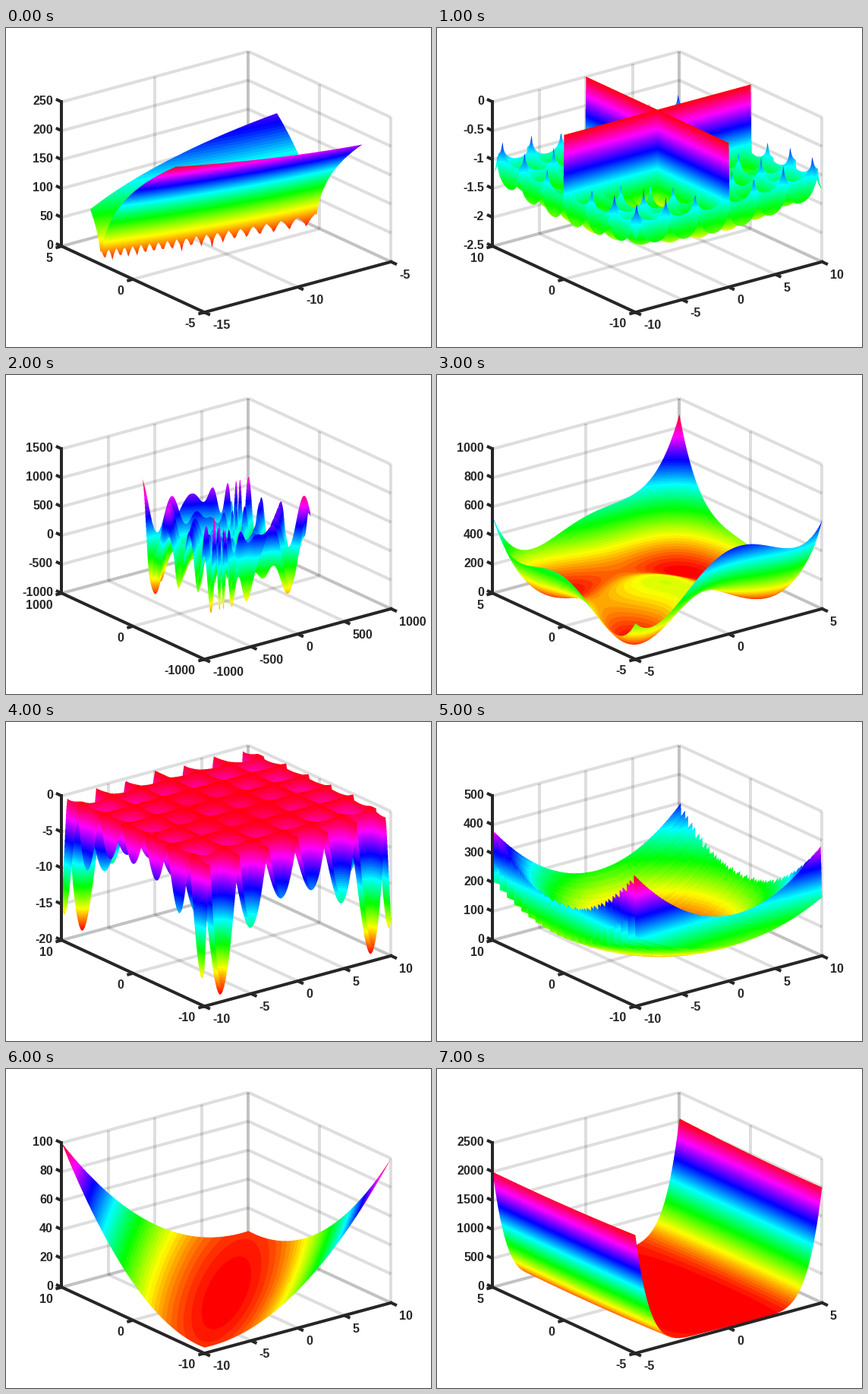
Write a matplotlib script that moves like this. It is 560 px wide and 420 px high and loops after 8000 ms.

```python
import numpy as np
import matplotlib.pyplot as plt
from matplotlib.animation import FuncAnimation
from matplotlib.colors import hsv_to_rgb

W, H, DPI = 560, 420, 100
PX = 72 / DPI
SUB = 3                      # subpixels per pixel side
LEVELS = 64
DARK = "#262626"
ORIGIN = np.array([261.4, 374.3])
UX = np.array([246.0, -66.5])
UY = np.array([-188.0, -87.0])
UZ = np.array([0.0, -190.0])


def bukin(x, y):
    return 100 * np.sqrt(abs(y - 0.01 * x**2)) + 0.01 * abs(x + 10)


def cross_in_tray(x, y):
    e = np.exp(abs(100 - np.hypot(x, y) / np.pi))
    return -0.0001 * (abs(np.sin(x) * np.sin(y) * e) + 1) ** 0.1


def eggholder(x, y):
    s = y + 47
    return (-s * np.sin(np.sqrt(abs(x / 2 + s)))
            - x * np.sin(np.sqrt(abs(x - s))))


def himmelblau(x, y):
    return (x**2 + y - 11) ** 2 + (x + y**2 - 7) ** 2


def holder_table(x, y):
    e = np.exp(abs(1 - np.hypot(x, y) / np.pi))
    return -abs(np.sin(x) * np.cos(y) * e)


def levi(x, y):
    return (np.sin(3 * np.pi * x) ** 2
            + (x - 1) ** 2 * (1 + np.sin(3 * np.pi * y) ** 2)
            + (y - 1) ** 2 * (1 + np.sin(2 * np.pi * y) ** 2))


def matyas(x, y):
    return 0.26 * (x**2 + y**2) - 0.48 * x * y


def camel(x, y):
    return 2 * x**2 - 1.05 * x**4 + x**6 / 6 + x * y + y**2


def nice_ticks(data, max_parts):
    """Ticks at the smallest 1-2-5 step that needs few enough parts."""
    lo, hi = data.min(), data.max()
    need = (hi - lo) / max_parts
    base = 10.0 ** np.floor(np.log10(need))
    step = base * next(m for m in (1, 2, 5, 10) if m * base >= need - 1e-9)
    first, last = np.floor(lo / step + 1e-9), np.ceil(hi / step - 1e-9)
    return np.round(np.arange(first, last + 1) * step, 6) + 0.0


def unit(a, ticks):
    return (a - ticks[0]) / (ticks[-1] - ticks[0])


def bilinear(w, i, j):
    i0 = np.clip(i.astype(int), 0, w.shape[0] - 2)
    j0 = np.clip(j.astype(int), 0, w.shape[1] - 2)
    s, t = i - i0, j - j0
    near = w[i0, j0] * (1 - s) + w[i0 + 1, j0] * s
    far = w[i0, j0 + 1] * (1 - s) + w[i0 + 1, j0 + 1] * s
    return near * (1 - t) + far * t


def render(u, v, w):
    """Cut the surface along each subpixel column and paint back to front."""
    c = ((np.arange(W * SUB) + 0.5) / SUB - ORIGIN[0])[:, None]
    cu = np.sort(np.hstack([np.repeat(u[None], len(c), 0),
                            (c - v * UY[0]) / UX[0]]), axis=1)[:, ::-1]
    cv = (c - cu * UX[0]) / UY[0]
    i, j = (cu - u[0]) / (u[1] - u[0]), (cv - v[0]) / (v[1] - v[0])
    eps = 1e-6
    inside = ((i > -eps) & (i < len(u) - 1 + eps)
              & (j > -eps) & (j < len(v) - 1 + eps))
    cw = bilinear(w, i, j)
    y = SUB * (ORIGIN[1] + cu * UX[1] + cv * UY[1] + cw * UZ[1])

    ok = inside[:, :-1] & inside[:, 1:]
    col = np.nonzero(ok)[0]
    ya, yb = y[:, :-1][ok], y[:, 1:][ok]
    wa, wb = cw[:, :-1][ok], cw[:, 1:][ok]
    top = np.ceil(np.minimum(ya, yb) - 0.5).astype(int)
    count = np.ceil(np.maximum(ya, yb) - 0.5).astype(int) - top
    k = np.repeat(np.arange(len(col)), count)
    row = top[k] + np.arange(len(k)) - (np.cumsum(count) - count)[k]
    part = (row + 0.5 - ya[k]) / (yb[k] - ya[k])

    height = np.full((H * SUB, W * SUB), np.nan)
    height[np.clip(row, 0, H * SUB - 1), col[k]] = wa[k] + (wb - wa)[k] * part
    return colorize(height, w.min(), w.max())


def colorize(height, lo, hi):
    hue = np.arange(LEVELS) / LEVELS
    cmap = hsv_to_rgb(np.stack([hue, hue * 0 + 1, hue * 0 + 1], axis=1))
    seen = ~np.isnan(height)
    level = ((height[seen] - lo) / (hi - lo) * LEVELS).astype(int)
    img = np.zeros(height.shape + (4,))
    img[seen, :3] = cmap[np.clip(level, 0, LEVELS - 1)]
    img[seen, 3] = 1
    img = img.reshape(H, SUB, W, SUB, 4).mean(axis=(1, 3))
    img[..., :3] /= np.maximum(img[..., 3:], 1e-9)
    return np.clip(img, 0, 1)


def build(f, rx, ry=None, mid=0, step=0.1):
    def samples(r):
        return np.round(np.arange(-r, r + step / 2, step), 6)

    x, y = mid + samples(rx), samples(ry or rx)
    z = f(x[:, None], y[None, :])
    ticks = [nice_ticks(a, n) for a, n in ((x, 4), (y, 2), (z, 5))]
    img = render(*(unit(a, t) for a, t in zip((x, y, z), ticks)))
    return img, ticks


SCENES = [
    build(bukin, 5, ry=3, mid=-10),
    build(cross_in_tray, 10),
    build(eggholder, 512, step=4),
    build(himmelblau, 5),
    build(holder_table, 10),
    build(levi, 10),
    build(matyas, 10),
    build(camel, 5),
]

fig = plt.figure(figsize=(W / DPI, H / DPI), dpi=DPI, facecolor="white")
ax = fig.add_axes([0, 0, 1, 1])


def project(u, v, w):
    return ORIGIN + u * UX + v * UY + w * UZ


def line(p, q, z, cap="butt", alpha=1):
    ax.plot(*zip(p, q), color=DARK, lw=4 * PX, zorder=z, alpha=alpha,
            solid_capstyle=cap)


def grid(*points):
    for p, q in zip(points, points[1:]):
        line(project(*p), project(*q), 1, alpha=0.15)


def axis(p, q):
    line(project(*p), project(*q), 3, cap="projecting")


def tick(p, direction, value, dx, dy, ha):
    line(p, p + 8.3 * direction / np.hypot(*direction), 3)
    ax.text(p[0] + dx, p[1] + dy, f"{value:g}", ha=ha, va="center_baseline",
            color=DARK, family="Liberation Sans", weight="bold",
            size=16 * PX, zorder=4)


def draw(i):
    ax.clear()
    ax.axis("off")
    img, (xt, yt, zt) = SCENES[i]

    for val, u in zip(xt, unit(xt, xt)):
        grid((u, 0, 0), (u, 1, 0), (u, 1, 1))
        tick(project(u, 0, 0), -UY, val, 10.5, 16.2, "left")
    for val, v in zip(yt, unit(yt, yt)):
        grid((0, v, 0), (1, v, 0), (1, v, 1))
        tick(project(0, v, 0), -UX, val, -12, 14.2, "right")
    for val, w in zip(zt, unit(zt, zt)):
        grid((0, 1, w), (1, 1, w), (1, 0, w))
        tick(project(0, 1, w), UY, val, -11.4, -2.2, "right")

    axis((0, 0, 0), (1, 0, 0))
    axis((0, 0, 0), (0, 1, 0))
    axis((0, 1, 0), (0, 1, 1))

    ax.imshow(img, extent=(0, W, H, 0), interpolation="nearest",
              aspect="auto", zorder=2)
    ax.set_xlim(0, W)
    ax.set_ylim(H, 0)
    return []


anim = FuncAnimation(fig, draw, frames=len(SCENES), init_func=lambda: [],
                     interval=1000, repeat=True, repeat_delay=0)
plt.show()
```
